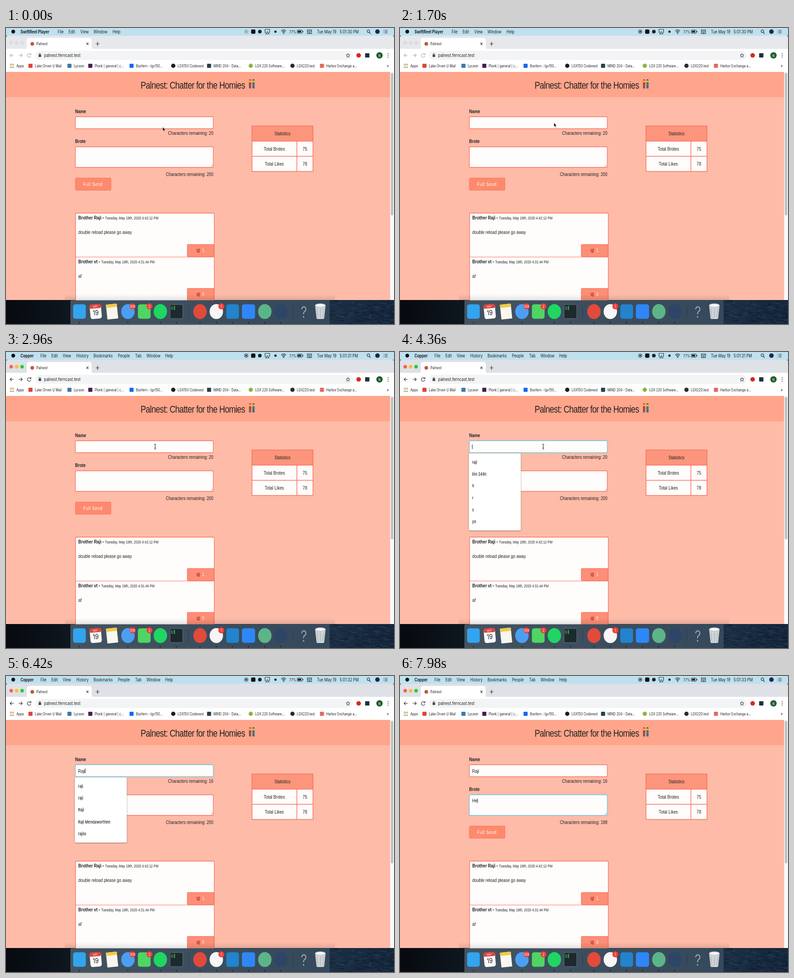
These frames come from a looping animation (856x654 px, 8000 ms). An HTML page:

```html
<!DOCTYPE html>
<html lang="en">
<head>
<meta charset="utf-8">
<title>Message board demo</title>
<style>
  html, body { margin: 0; width: 100%; height: 100%; overflow: hidden; background: #0a1018; }
  svg { display: block; width: 856px; height: 654px; }
  text { font-family: "Liberation Sans", Arial, sans-serif; fill: #222; white-space: pre; }
  .ui { font-family: Inter, "Open Sans", sans-serif; }
  .bold { font-weight: 700; }
  .mid { text-anchor: middle; }
  .end { text-anchor: end; }
  .white { fill: #fff; }
  .box { fill: #fffdfc; stroke: #fa705d; stroke-width: 1.3; }
  .box.focus { stroke: #6fc3dc; stroke-width: 1.3; }
  .line { fill: none; stroke: #33373b; stroke-width: 1.2; }
  #menu { filter: drop-shadow(0 1px 1.5px #0006); }
</style>
</head>
<body>
<svg id="stage" viewBox="0 0 856 654"></svg>
<script>
const LOOP = 8000;
// The screen is 1440 x 900, shown squeezed onto the stage.
const SCALE = `scale(${856 / 1440} ${654 / 900})`;

const text = (x, y, str, size = 15, cls = '', id = '', extra = '') =>
  `<text transform="translate(${x} ${y}) ${SCALE}" font-size="${size}" class="${cls}" id="${id}" ${extra}>${str}</text>`;
const rect = (x, y, w, h, fill, r = 0, extra = '') =>
  `<rect x="${x}" y="${y}" width="${w}" height="${h}" rx="${r}" fill="${fill}" ${extra}/>`;
const disc = (x, y, r, fill, extra = '') =>
  `<circle cx="${x}" cy="${y}" r="${r}" fill="${fill}" ${extra}/>`;
const path = (d, extra = 'class="line"') => `<path d="${d}" ${extra}/>`;
const box = (x, y, w, h, id = '') =>
  `<rect class="box" x="${x}" y="${y}" width="${w}" height="${h}" rx="2" id="${id}"/>`;
const square = (x, y, s, fill, r = 1) => rect(x - s / 2, y - s / 2, s, s, fill, r);
const menuItems = list => list.map(([x, s], i) =>
  text(x, 11.5, s, 13.5, 'ui' + (i ? '' : ' bold'))).join('');

function wallpaper() {
  let seed = 7;
  const rnd = () => (seed = seed * 16807 % 2147483647) / 2147483647;
  const shades = ['#2f4962', '#0c1826', '#24394f', '#101f30'];
  let waves = '';
  for (let i = 0; i < 180; i++) {
    const x = 712 + rnd() * 142, y = 602 + rnd() * 52, w = 3 + rnd() * 12;
    waves += path(`M${x} ${y}q${w / 2} ${rnd() * 3 - 1.5} ${w} ${rnd() * 2 - .5}`,
      `fill="none" stroke="${shades[i % 4]}" stroke-width=".9"`);
  }
  return rect(0, 0, 856, 654, 'url(#sea)') + waves;
}

function menuBar() {
  return rect(0, 0, 856, 17, '#bfe0ef') + disc(16, 8, 4.2, '#111') +
    `<g id="playerBar">${menuItems([[32, 'SwiftReel Player'], [114, 'File'], [138, 'Edit'], [164, 'View'], [193, 'Window'], [235, 'Help']])}</g>` +
    `<g id="browserBar">${menuItems([[32, 'Copper'], [76, 'File'], [100, 'Edit'], [125, 'View'], [155, 'History'], [193, 'Bookmarks'], [247, 'People'], [285, 'Tab'], [310, 'Window'], [351, 'Help']])}</g>` +
    `<g id="record">${disc(530, 8, 4, 'none', 'stroke="#222"')}${square(530, 8, 3.6, '#222', .5)}</g>` +
    square(545.5, 8, 9.5, '#111', 2.5) + disc(560, 8, 4, '#222') +
    path('M573 10h-1.5v-7h10v7h-1.5M576.5 8l-3.5 5h7z') + disc(594.5, 8, 2.6, '#222') +
    path('M607 6.5q5.5-5 11 0M608.8 8.7q3.7-3.4 7.4 0M610.6 10.7q1.9-1.8 3.8 0') + disc(612.5, 12, 1, '#222') +
    text(625, 11.5, '77%', 12, 'ui') +
    rect(642.5, 4.5, 11, 7, 'none', 1.5, 'stroke="#222"') + rect(644, 6, 7, 4, '#222') + rect(654.5, 6.5, 1.3, 3, '#222') +
    path('M665 4h9v8.5h-9zM665 6.5h9M667 9h5M667 11h5') +
    text(686, 11.5, 'Tue May 19', 13.5, 'ui') + text(736, 11.5, '', 13.5, 'ui', 'clock') +
    path('M801.5 9.5l3 3.5') + disc(799.5, 7, 2.9, 'none', 'class="line"') +
    disc(819.5, 8, 5, '#25254d') + path('M832 5h1M835 5h7M832 8h1M835 8h7M832 11h1M835 11h7');
}

function browser() {
  const marks = [
    [54, '#dc4538', 'Lake Orven U Mail'], [140, '#3e7aab', 'Lyceon'],
    [186, '#4a1d4f', 'Plonk | general | c...'], [277, '#1569f0', 'Boxfern - lgx150...'],
    [369, '#1b1f23', 'LGX150 Codenest', 1], [448, '#28404c', 'MIND 204 - Data...'],
    [540, '#8bb53f', 'LGX 220 Software...', 1], [632, '#2a2c2e', 'LGX220.test', 1],
    [697, '#e26a5d', 'Harbor Exchange a...']];
  const dots = ['#e8453c', '#f3b52a', '#3ca458'];
  let out = rect(0, 17, 856, 40, '#dee1e6', 4, 'id="strip"') +
    `<g id="lights">${['#fe5f57', '#febc2e', '#28c840'].map((c, i) => disc(11.5 + i * 12, 32.5, 3.9, c)).join('')}</g>` +
    `<g id="dimLights">${[0, 1, 2].map(i => disc(11.5 + i * 12, 32.5, 3.6, '#dcdee1', 'stroke="#cfd1d4" stroke-width=".6"')).join('')}</g>` +
    path('M41 47q5 0 5-5v-15q0-5 5-5h133q5 0 5 5v15q0 5 5 5z', 'fill="#fff"') +
    rect(0, 46, 856, 51, '#fff') + rect(65, 50.5, 700, 20, '#f3f4f5', 9) + disc(58, 35, 4, '#c4553a') +
    text(67, 38, 'Palnest', 12, 'ui') +
    path('M177.5 32.3l4.5 5M182 32.3l-4.5 5') + path('M198 35h8M202 30.5v9') +
    `<g id="nav">${path('M17 60.5h-8M12.5 57l-3.5 3.5l3.5 3.5M28 60.5h8M32.5 57l3.5 3.5l-3.5 3.5')}` +
    path('M54 58a4 4 0 1 0 1 3.5M55 55.5v3.5h-3.5') + '</g>' +
    rect(72, 59, 5.5, 5, '#444', .6) + path('M73.2 59v-1.5q1.5-2.5 3 0v1.5') +
    text(84, 64, 'palnest.ferncast.test', 14, 'ui') +
    path('M754.5 56l1.2 3.2l3 .2l-2.4 2.1l.9 3.2l-2.7-1.8l-2.7 1.8l.9-3.2l-2.4-2.1l3-.2z', 'fill="none" stroke="#333"') +
    disc(778, 60.5, 5, '#d42a20') + square(797, 60.5, 9.5, '#20303a') +
    disc(824, 60.5, 7, '#1f5b2c') + text(824, 63.7, 'N', 11, 'ui mid white') +
    [56.5, 60.5, 64.5].map(y => disc(843, y, 1, '#444')).join('');
  for (let i = 0; i < 9; i++)
    out += square(9.7 + i % 3 * 3.2, 80.3 + (i / 3 | 0) * 3.4, 2, dots[i / 3 | 0], 0);
  out += text(23, 87, 'Apps', 11.5, 'ui');
  for (const [x, color, label, round] of marks)
    out += (round ? disc(x, 83.5, 4.7, color) : square(x, 83.5, 9, color)) +
      text(x + 9.7, 87, label, 11.5, 'ui');
  return out + text(840, 87, '»', 13, 'ui');
}

const man = (x, shirt, hair) =>
  disc(x, 117, 2.5, '#f1b83b') + path(`M${x - 2.6} 117q0-3.5 2.6-3.5t2.6 3.5l-1-1.5h-3.2z`, `fill="${hair}"`) +
  rect(x - 3.3, 120, 6.6, 6, '#f1b83b', 1.5) + rect(x - 2.5, 119.7, 5, 7, shirt, 1) +
  rect(x - 2.2, 126.5, 1.9, 7, '#35506b') + rect(x + .3, 126.5, 1.9, 7, '#35506b');

function likeButton(y, count) {
  return rect(400, y, 59, 27, '#fc8f76', 2, 'stroke="#fa705d" stroke-width="1.2"') +
    `<g transform="rotate(-8 424 ${y + 13})">` +
    text(424, y + 14, '100', 8.5, 'bold mid', '', 'font-style="italic" style="fill:#c9101d"') +
    path(`M420.5 ${y + 15.5}h7M422 ${y + 17.3}h4.5`, 'stroke="#c9101d"') + '</g>' +
    text(435, y + 17, count, 14, 'mid white');
}

function post(y, name, bulletX, date, message, likes) {
  return text(159.5, y + 14, 'Brother ' + name, 15, 'bold') + text(bulletX, y + 14, '•', 12) +
    text(bulletX + 5.5, y + 14, date, 12) + text(159.5, y + 46, message) + likeButton(y + 69.3, likes);
}

function page() {
  return rect(0, 97, 848, 504, '#fdbba8') + rect(0, 97, 848, 56, '#fea58b') +
    rect(847.5, 97, 8.5, 504, '#fafafa') + rect(849, 99, 5.5, 315, '#c1c1c1', 2.7) +
    text(297, 133.5, 'Palnest: Chatter for the Homies', 30, '', '', 'letter-spacing="-1"') +
    man(538.5, '#d8322b', '#6b4320') + man(546, '#287f9e', '#3a2a20') +
    text(152.5, 187.5, 'Name', 15, 'bold') + box(153, 196, 304.3, 26.5, 'nameBox') +
    text(159, 213.5, '', 15, '', 'nameText') + text(457.5, 235.5, '', 15, 'end', 'nameLeft') +
    text(152.5, 254, 'Brote', 15, 'bold') + box(153, 262.5, 304.3, 45.5, 'broteBox') +
    path('M452 306.5l4-4.5M454.5 306.5l1.5-1.7', 'stroke="#777" stroke-width=".7"') +
    text(159, 279, '', 15, '', 'broteText') + text(457.5, 326.5, '', 15, 'end', 'broteLeft') +
    rect(153, 331.5, 78.7, 27, '#fd8a6c', 2, 'stroke="#fa755f" stroke-width="1"') +
    text(170.3, 349, 'Full Send', 15, 'white', '', 'letter-spacing="1"') +
    rect(542.7, 216.5, 134.6, 100.5, '#fffdfc') + rect(542.7, 216.5, 134.6, 33.5, '#fc957b') +
    path('M542.7 216.5h134.6v100.5h-134.6zM542.7 250h134.6M542.7 283.5h134.6M641.7 250v67', 'fill="none" stroke="#fa705d" stroke-width="1.5"') +
    text(610, 237, 'Statistics', 15, 'mid') + text(592, 270.5, 'Total Brotes', 15, 'mid') + text(659.5, 270.5, '75', 15, 'mid') +
    text(592, 304, 'Total Likes', 15, 'mid') + text(659.5, 304, '78', 15, 'mid') +
    box(153.5, 409, 306, 200) + path('M153.5 506h306', 'stroke="#fa705d"') +
    post(409, 'Raji', 213, 'Tuesday, May 19th, 2020 4:42:12 PM', 'double reload please go away', 1) +
    post(506, 'vt', 204.5, 'Tuesday, May 19th, 2020 4:31:44 PM', 'af', 0) +
    '<g id="menu"></g>' + rect(0, 0, 1, 10, '#222', 0, 'id="caret"');
}

function dock() {
  const y = 626.5;
  const icon = (x, color, w = 28) => rect(x - w / 2, y - 16, w, 32, color, 5);
  const round = (x, color) => `<ellipse cx="${x}" cy="${y}" rx="14.8" ry="16.5" fill="${color}"/>`;
  const badge = (x, n) => disc(x, 615, 6.6, '#f5403a') + text(x, 618, n, 11, 'ui mid white');
  return rect(130, 588, 596, 13, 'url(#shade)') + rect(0, 601, 856, 53, 'url(#sea)', 0, 'opacity="0"') +
    rect(142, 601.5, 572, 56, 'url(#dock)', 3) +
    icon(162, '#33a4ee') +
    `<g transform="rotate(-5 198 ${y})">${icon(198, '#fafafa', 25)}${rect(185.5, 610.5, 25, 9, '#e0453c', 3)}` +
    text(198, 617.5, 'MAY', 8, 'ui mid white') + text(198, 634.5, '19', 21, 'ui mid') + '</g>' +
    `<g transform="rotate(-6 234 ${y})">${rect(222, 610, 24, 33, '#f8f6ee', 1)}${rect(222, 610, 24, 7, '#f2cb45', 1)}</g>` +
    round(269, '#4b9ff3') + icon(305, '#4fd562') + round(340.5, '#1fd662') +
    rect(362, 611, 28, 31, '#1c292d', 2, 'stroke="#69777c" stroke-width="1"') + text(364, 622, '$', 13, '', '', 'style="fill:#3fd15c"') + rect(370, 614, 3, 9, '#3d8b4f') +
    rect(402.5, 612, 1, 30, '#2b3c4a') + round(428, '#e24a3b') + round(464, '#f7f5f6') +
    icon(500, '#2383cc') + icon(535, '#2f87f7', 29) + round(571, '#5cb588') + round(606.5, '#2d4567') +
    rect(632.5, 612, 1, 30, '#2b3c4a') +
    text(657, 640, '?', 46, 'ui mid', '', 'font-weight="300" style="fill:#a9b4bd"') +
    path('M682 613h23l-3 28q-.5 2-2.5 2h-12q-2 0-2.5-2z', 'fill="#cfd4d7"') +
    `<ellipse cx="693.5" cy="613" rx="11.5" ry="4" fill="#f4f5f5" stroke="#aab1b5"/>` +
    path('M686 620l2 20M693.5 620v20M701 620l-2 20', 'stroke="#a9b0b4" stroke-width="1.2"') +
    badge(279, 308) + badge(316.5, 2) + badge(475, 1) +
    [162, 269, 340.5, 376, 428, 464, 499.5, 535, 571, 606].map(x => disc(x, 651, 1.2, '#10161b')).join('');
}

const stage = document.getElementById('stage');
stage.innerHTML = `<defs>
  <linearGradient id="sea"><stop offset="0" stop-color="#070a0f"/><stop offset=".16" stop-color="#0e161f"/><stop offset=".85" stop-color="#1b2e43"/><stop offset="1" stop-color="#14253a"/></linearGradient>
  <linearGradient id="dock"><stop offset="0" stop-color="#435360"/><stop offset="1" stop-color="#35495c"/></linearGradient>
  <linearGradient id="shade" x2="0" y2="1"><stop offset="0" stop-opacity="0"/><stop offset="1" stop-opacity=".1"/></linearGradient></defs>` +
  wallpaper() + menuBar() + browser() + page() + dock() +
  `<g id="arrow">${path('M0 0v9.5l2.1-2l1.5 3.6l1.5-.7l-1.5-3.5h2.7z', 'fill="#111" stroke="#fff" stroke-width=".7"')}</g>` +
  `<g id="beam">${path('M-2-5.5q2 0 2 1.5q0-1.5 2-1.5M0-4v8M-2 5.5q2 0 2-1.5q0 1.5 2 1.5M-1 1.5h2', 'fill="none" stroke="#222" stroke-width="1"')}</g>`;

const el = id => document.getElementById(id);
const show = (id, on) => el(id).style.display = on ? '' : 'none';
const stepAt = (steps, t) => steps.reduce((v, [time, value]) => t >= time ? value : v, steps[0][1]);

const RECORD_ON = 840, ACTIVATE = 2520, FOCUS = 3760, TYPE = 4900, NEXT_FIELD = 6950;
const seconds = [[0, 30], [2050, 31], [4700, 32], [7350, 33]];
const nameTyped = [[0, ''], [TYPE, 'R'], [5250, 'Ra'], [5640, 'Raj'], [6000, 'Raji']];
const broteTyped = [[0, ''], [7450, 'H'], [7760, 'He']];
const suggestions = [[0, ''], [FOCUS, 'raji,bio 248c,h,r,s,yo'],
  [TYPE, 'raji,r,raji,ra,Raji,Raji Mendaworthen'],
  [5500, 'raji,raji,ra,Raji,Raji Mendaworthen,rajilo'],
  [5700, 'raji,raji,Raji,Raji Mendaworthen,rajilo'], [NEXT_FIELD, '']];
const pointer = [[0, 345.7, 218.5], [300, 345.7, 218.5], [1500, 339.7, 209], [2100, 339, 209],
  [2960, 329, 209], [3700, 316, 209], [LOOP, 316, 209]];

function pointerAt(t) {
  const i = pointer.findIndex(p => p[0] > t);
  const [a, b] = [pointer[i - 1], pointer[i]];
  const k = (t - a[0]) / (b[0] - a[0]);
  return `translate(${a[1] + (b[1] - a[1]) * k} ${a[2] + (b[2] - a[2]) * k})`;
}

let openList = null;
function drawSuggestions(list) {
  if (list === openList) return;
  openList = list;
  const items = list ? list.split(',') : [];
  el('menu').innerHTML = list && rect(152, 224, 114.5, 13 + items.length * 26.2, '#fff', 2) +
    items.map((s, i) => text(159, 247 + i * 26.2, s, 13, 'ui', '', 'font-weight="500"')).join('');
}

function render(t) {
  const active = t >= ACTIVATE, inName = t >= FOCUS && t < NEXT_FIELD, inBrote = t >= NEXT_FIELD;
  const name = stepAt(nameTyped, t), brote = stepAt(broteTyped, t);
  show('playerBar', !active);
  show('browserBar', active);
  show('lights', active);
  show('dimLights', !active);
  el('strip').setAttribute('fill', active ? '#dee1e6' : '#e6e8eb');
  el('nav').style.opacity = active ? 1 : .4;
  el('record').style.opacity = t < RECORD_ON ? .4 : 1;
  el('clock').textContent = `5:01:${stepAt(seconds, t)} PM`;

  el('nameText').textContent = name;
  el('broteText').textContent = brote;
  el('nameLeft').textContent = `Characters remaining: ${20 - name.length}`;
  el('broteLeft').textContent = `Characters remaining: ${200 - brote.length}`;
  el('nameBox').classList.toggle('focus', inName);
  el('broteBox').classList.toggle('focus', inBrote);
  drawSuggestions(stepAt(suggestions, t));

  show('caret', inName || inBrote);
  const field = el(inBrote ? 'broteText' : 'nameText');
  el('caret').setAttribute('x', 159 + field.getComputedTextLength() * 856 / 1440);
  el('caret').setAttribute('y', inBrote ? 270.5 : 204.5);

  show('arrow', !active);
  show('beam', active && t < TYPE);
  el('arrow').setAttribute('transform', pointerAt(t));
  el('beam').setAttribute('transform', pointerAt(t));
}

const start = performance.now();
function tick() {
  render((performance.now() - start) % LOOP);
  requestAnimationFrame(tick);
}
tick();
</script>
</body>
</html>
```
